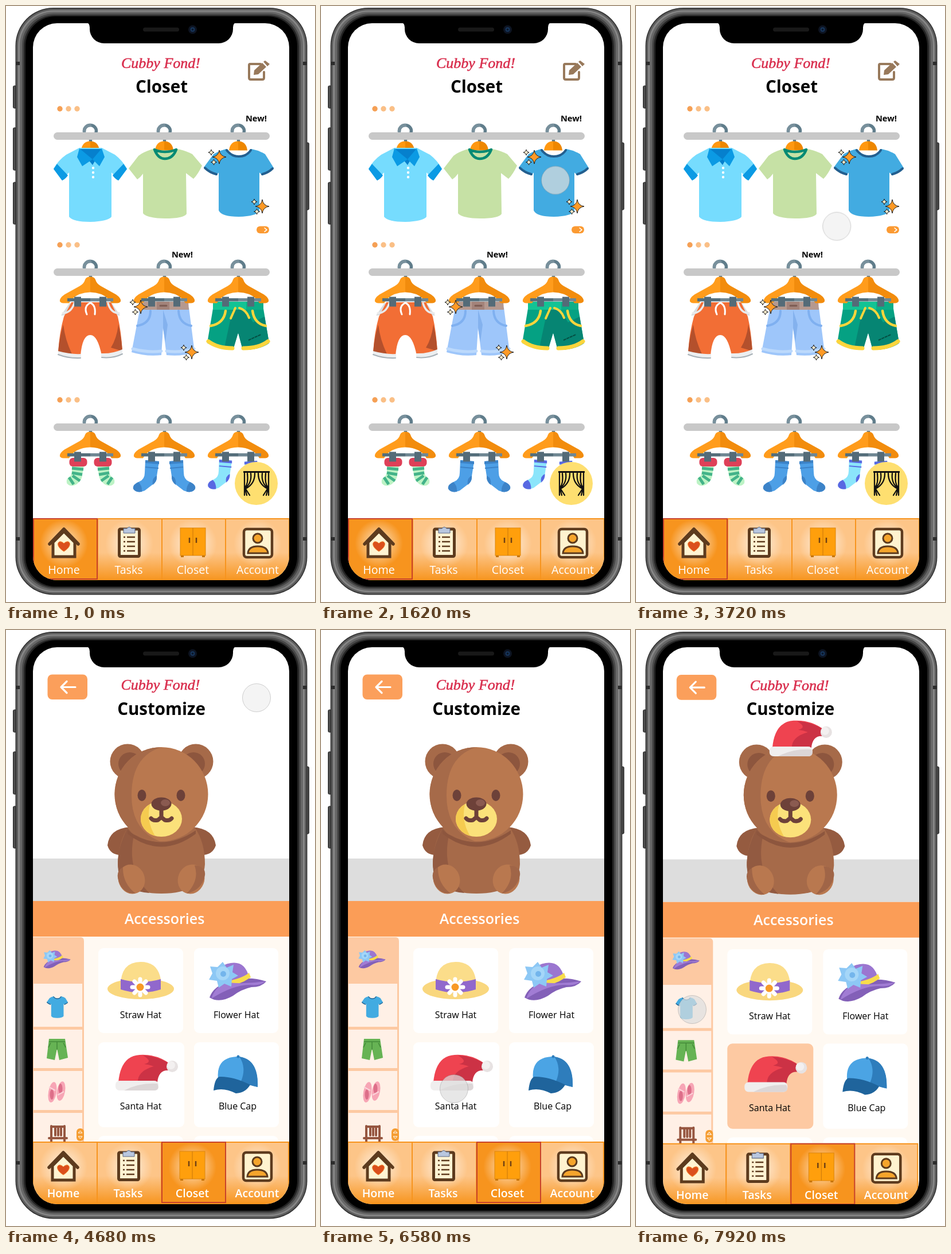
An HTML page for the animation above (8 s loop, 539 by 1038 pixels).

```html
<!DOCTYPE html>
<html lang="en">
<head>
<meta charset="utf-8">
<title>Closet app</title>
<style>
html, body { margin: 0; width: 100%; height: 100%; overflow: hidden; background: #fff; }
svg { display: block; width: 100%; height: 100%; }
text { font-family: 'Open Sans', 'Noto Sans', sans-serif; }
.logo { font: italic 26px 'Liberation Serif', 'Noto Serif', serif; fill: #d9304f; stroke: #d9304f; stroke-width: .6; text-anchor: middle; }
.title { font-size: 29.5px; font-weight: 650; text-anchor: middle; }
.new { font-size: 14.6px; font-weight: 700; }
.info { font-size: 20px; }
.b { font-weight: 600; }
.tab { font-size: 19.6px; fill: #fff; text-anchor: middle; }
.card { font-size: 16px; text-anchor: middle; }
.a { fill: var(--a); }
.c { fill: var(--c); }
.line { fill: none; stroke-linecap: round; stroke-linejoin: round; }
.faded { opacity: .33; filter: blur(2.5px); }

.page { visibility: hidden; animation: 8s step-end infinite; }
#closet { animation-name: closet; }
#popup { animation-name: popup; }
#plain { animation-name: plain; }
#dressed { animation-name: dressed; }
@keyframes closet { 0%, 39.75% { visibility: visible; } 22.5%, 58.5%, 100% { visibility: hidden; } }
@keyframes popup { 0%, 39.75%, 100% { visibility: hidden; } 22.5% { visibility: visible; } }
@keyframes plain { 0%, 83.5%, 100% { visibility: hidden; } 58.5% { visibility: visible; } }
@keyframes dressed { 0% { visibility: hidden; } 83.5%, 100% { visibility: visible; } }

#px { animation: moveX 8s linear infinite; }
#py { animation: moveY 8s linear infinite; }
#dot { fill: rgba(238,238,238,.65); stroke: rgba(125,125,125,.35); animation: show 8s step-end infinite, press 8s step-end infinite; }
@keyframes show { 0% { visibility: hidden; } 4.75%, 100% { visibility: visible; } }
@keyframes press {
  0%, 22.5%, 39.75%, 58.5%, 83.5% { fill: rgba(238,238,238,.65); }
  20.25%, 38%, 57%, 82.25%, 99%, 100% { fill: rgba(222,222,222,.71); }
}
@keyframes moveX {
  0%, 4.75% { transform: translateX(482px); animation-timing-function: ease; }
  10.75%, 12.75% { transform: translateX(404px); }
  13.75% { transform: translateX(409px); }
  26.75% { transform: translateX(409px); animation-timing-function: cubic-bezier(.37,0,.63,1); }
  36% { transform: translateX(279px); }
  45% { transform: translateX(279px); animation-timing-function: cubic-bezier(.3,1,.6,1); }
  54.25% { transform: translateX(437px); }
  63.25% { transform: translateX(437px); animation-timing-function: cubic-bezier(.76,0,.24,1); }
  78.75% { transform: translateX(232px); }
  89.5% { transform: translateX(232px); animation-timing-function: cubic-bezier(.45,0,.55,1); }
  98.25%, 100% { transform: translateX(98px); }
}
@keyframes moveY {
  0%, 4.75% { transform: translateY(29px); animation-timing-function: ease; }
  10.75%, 12.75% { transform: translateY(311px); }
  13.75% { transform: translateY(303.5px); }
  26.75% { transform: translateY(303.5px); animation-timing-function: cubic-bezier(.65,0,.35,1); }
  36% { transform: translateY(622px); }
  45% { transform: translateY(622px); animation-timing-function: cubic-bezier(.28,1,.57,1); }
  54.25% { transform: translateY(118px); }
  63.25% { transform: translateY(118px); animation-timing-function: cubic-bezier(.45,0,.55,1); }
  78.75% { transform: translateY(799px); }
  89.5% { transform: translateY(799px); animation-timing-function: cubic-bezier(.45,0,.55,1); }
  98.25%, 100% { transform: translateY(661px); }
}
</style>
</head>
<body>
<svg viewBox="0 0 539 1038">
<defs>
  <clipPath id="screen"><rect x="47" y="30" width="447" height="970" rx="42"/></clipPath>
  <clipPath id="list"><rect x="47" y="534" width="447" height="358"/></clipPath>
  <clipPath id="head"><ellipse cx="271" cy="286" rx="81.500" ry="82"/></clipPath>
  <clipPath id="muzzle"><ellipse cx="271" cy="329" rx="36" ry="31"/></clipPath>
  <linearGradient id="cell" x2="0" y2="1"><stop offset="0" stop-color="#fdc588"/><stop offset=".55" stop-color="#fdc588"/><stop offset="1" stop-color="#f7951f"/></linearGradient>
  <radialGradient id="glow"><stop offset=".3" stop-color="#fff" stop-opacity=".55"/><stop offset="1" stop-color="#fff" stop-opacity="0"/></radialGradient>

  <!-- clothes rail parts -->
  <g id="hook" class="line" stroke="#607d8b" stroke-width="5.500">
    <path d="M-10.500 -8v-1a10.500 10 0 0 1 21 0q0 8-10 11v10"/>
    <path d="M-10.500 -8v-1a10.500 10 0 0 1 10-10" stroke="#78909c"/>
  </g>
  <g id="rail">
    <use href="#hook" x="147"/><use href="#hook" x="276"/><use href="#hook" x="405"/>
    <rect x="83" y="-6.500" width="377" height="13" rx="6.500" fill="#c8c8c8"/>
    <g fill="#fabf86"><circle cx="94" cy="-47.500" r="4.700" fill="#f5a055"/><circle cx="109" cy="-47.500" r="4.700"/><circle cx="124" cy="-47.500" r="4.700"/></g>
  </g>
  <g id="dome"><path d="M-16 25Q-14 9 0 9V25z" fill="#ff9811"/><path d="M16 25Q14 9 0 9V25z" fill="#ee8700"/></g>
  <g id="hanger">
    <path d="M0 8Q-7 8-9 13Q-11 20-18 24L-45 39Q-54 45-53 51Q-51 54-47 54H-37Q-27 36 0 35z" fill="#ff9c1c"/>
    <path d="M0 8Q7 8 9 13Q11 20 18 24L45 39Q54 45 53 51Q51 54 47 54H37Q27 36 0 35z" fill="#f28c0d"/>
    <path d="M-40 45.500H0v5.500H-40z" fill="#546e7a"/><path d="M0 45.500H40v5.500H0z" fill="#6f8793"/>
    <path d="M-28 43h12v17h-12zM16 43h12v17H16z" fill="#546b78"/>
  </g>
  <g id="hangers"><use href="#hanger" x="147"/><use href="#hanger" x="276"/><use href="#hanger" x="405"/></g>
  <g id="spark" stroke="#222">
    <path d="M0-12Q1.500-1.500 12 0Q1.500 1.500 0 12Q-1.500 1.500-12 0Q-1.500-1.500 0-12Z" fill="#ff9a26"/>
    <path d="M-14-13q.6 4.400 5 5q-4.400.6-5 5q-.6-4.400-5-5q4.400-.6 5-5zM-9.500 4q.6 4.400 5 5q-4.400.6-5 5q-.6-4.400-5-5q4.400-.6 5-5z" fill="#fff1cf"/>
  </g>

  <!-- tops -->
  <g id="blueTee">
    <path d="M-22 0Q-34 3-44 9L-61 32Q-52 42-39 46L-35 41V107Q-30 118 0 118Q31 117 36 108V41L41 46Q53 42 61 33L46 9Q34 2 22 0Q14 11 0 11Q-13 11-22 0Z" fill="#42abe1"/>
    <g class="line" stroke="#235f8f" stroke-width="4"><path d="M-21 2Q-13 13 0 13Q14 13 21 2"/><path d="M-59 33Q-51 41-39 44M41 44Q52 41 59 34"/></g>
  </g>
  <g id="polo">
    <path d="M-19 0L-42 12Q-55 21-64 36L-50 56L-37 43V120Q-30 129 0 129Q31 128 37 120V43L50 56L64 36Q55 21 43 12L20 0z" fill="#76dcfe"/>
    <path d="M-58 28l-6 9l15 20q6-3 10-9zM58 28l6 9l-15 20q-6-3-10-9z" fill="#0b9ae4"/>
    <path d="M-18 2L4 30L20 2z" fill="#0680cd"/>
    <path d="M-19 1L-23 16L-14 32L4 20zM20 1L25 16L16 32L4 20z" fill="#0b9ae4"/>
    <g fill="#fff"><circle cx="5" cy="35" r="2.200"/><circle cx="5" cy="43" r="2.200"/><circle cx="5" cy="51" r="2.200"/></g>
  </g>
  <g id="greenTee">
    <path d="M-20 0Q-38 5-46 12L-63 34L-48 53Q-42 49-38 43V112Q-33 120 0 121Q33 121 38 113L37 42L50 52Q58 44 65 29L48 9Q34 2 21 0Q12 3 0 3Q-12 3-20 0Z" fill="#c6e1a5"/>
    <path d="M-18 1Q-12 17 0 17Q14 17 20 1Q10 5 0 5Q-10 5-18 1z" fill="#b2d293" class="line" stroke="#048a74" stroke-width="4.500"/>
  </g>

  <!-- bottoms -->
  <g id="redShorts">
    <path d="M-36 2L-51 24Q-38 25-28 8zM37 2L52 24Q40 25 31 8z" fill="#d8dde0"/>
    <path d="M-33 1L-46 26Q-54 54-56 88L-17 94Q-14 58 0 58Q13 58 20 94L56 86Q54 52 48 26L36 1z" fill="#f26e35"/>
    <path d="M-47 40Q-54 62-56 88L-32 91Q-44 66-47 40zM49 40Q46 64 36 80L56 86Q54 60 49 40z" fill="#b4502c"/>
    <path d="M-48 20Q-34 20-28 3M50 20Q36 20 31 3" class="line" stroke="#e9eaec" stroke-width="3.500"/>
    <path d="M-56 86Q-34 92-16 91V98Q-38 100-56 92zM56 83Q38 91 19 90V97Q40 99 56 91z" fill="#eceff1"/>
    <path d="M-56 92Q-38 99-17 98M56 91Q40 99 20 97" class="line" stroke="#a9b2b8" stroke-width="2"/>
    <path d="M0 2Q-12 8-6 22M0 2Q10 6 8 22" class="line" stroke="#fff" stroke-width="3"/>
  </g>
  <g id="jeans">
    <path d="M-42 10L-57 88Q-30 96-5 93L-2 45L4 93Q30 96 53 88L43 10z" fill="#9ec6fa"/>
    <path d="M-2 14V46L2 70L6 40z" fill="#84b2ee"/>
    <path d="M-43 0h85l1 14H-44z" fill="#b5998f"/><path d="M-13 0H9v14h-22z" fill="#a3837a"/>
    <path d="M-7 7H4" class="line" stroke="#7b5b52" stroke-width="3"/>
    <path d="M-24 16Q-24 38-47 42M25 16Q26 38 47 42" class="line" stroke="#7fb0f0" stroke-width="4"/>
    <path d="M-55 82Q-30 89-5 86M4 86Q30 89 52 82" class="line" stroke="#bcd9fc" stroke-width="5"/>
  </g>
  <g id="greenShorts">
    <path d="M-44 12L-54 72Q-35 84-9 84L0 54L8 84Q38 84 54 72L44 12z" fill="#05a183"/>
    <path d="M-10 14L-24 80L-9 84L0 54L8 84Q38 84 54 72L46 26L26 36L12 14z" fill="#068573"/>
    <path d="M-44 0H44V14H-44z" fill="#13c394"/><path d="M14 0H44V14H14z" fill="#0cae87"/>
    <g class="line" stroke="#fdd53c" stroke-width="4.500"><path d="M-22 16Q-25 38-48 42M25 16Q28 38 48 42"/><path d="M-52 69Q-36 81-10 81M9 81Q36 81 52 69" stroke-width="7"/><path d="M-5 11L-13 29M2 11Q14 14 19 28" stroke-width="4"/></g>
    <path d="M18 67l22-10" stroke="#054f43" stroke-width="2" stroke-dasharray="5 1"/>
  </g>

  <!-- socks -->
  <g id="sock">
    <path class="a" d="M-12 0L12 2L8 28Q9 37 0 43L-13 53Q-28 59-33 49Q-33 42-22 37Q-13 33-13 22z"/>
    <path class="c" d="M-24 38Q-35 43-33 50Q-29 57-18 55Q-17 45-24 38zM8 27Q-1 31 1 43Q9 37 8 27zM-12 0L12 2V7L-12 5z"/>
    <path d="M-12 12L11 14" stroke="var(--c)" stroke-width="2"/>
  </g>
  <g id="stripeSock">
    <path d="M-10 11L11 12L8 28Q8 38-2 45Q-13 51-19 43Q-21 35-13 31Q-9 26-10 11z" fill="#bdf3c5"/>
    <path d="M-10 17L10 19M-10 25L8 28M-9 30L4 39M-15 33L-7 45" stroke="#43b389" stroke-width="5"/>
    <rect x="-14.500" y="-1" width="31" height="15" rx="6" fill="#de4058"/>
  </g>
  <g id="socks">
    <use href="#stripeSock" x="125" y="788"/><use href="#stripeSock" transform="matrix(-1 0 0 1 170 788)"/>
    <g style="--a:#4d9fe6;--c:#3c83c8"><use href="#sock" x="255" y="791"/><use href="#sock" transform="matrix(-1 0 0 1 297 791)"/></g>
    <g style="--a:#8be5fb;--c:#5868e2"><use href="#sock" transform="translate(383 790) scale(.93)"/><use href="#sock" transform="matrix(-.93 0 0 .93 427 792)"/></g>
  </g>

  <!-- hats -->
  <g id="strawHat">
    <ellipse cx="235" cy="625" rx="58" ry="18" fill="#f9d77e"/>
    <path d="M200 625Q198 578 235 578Q272 578 271 625z" fill="#fbdd8a"/>
    <path d="M200 608Q235 618 270 608V626Q235 637 200 626z" fill="#9168cc"/>
    <path d="M234 608V636M220 622H248M224 612L244 632M244 612L224 632" stroke="#fff" stroke-width="7" stroke-linecap="round"/>
    <circle cx="234" cy="622" r="6.500" fill="#f89a26"/>
  </g>
  <g id="flowerHat">
    <path d="M355 640Q362 620 388 613Q420 601 454 612Q446 622 428 622Q410 626 396 637Q372 651 355 640z" fill="#8360b8"/>
    <path d="M375 619Q362 584 392 580Q417 576 424 605Q400 621 375 619z" fill="#9b76d0"/>
    <path d="M382 612Q410 608 424 597L427 605Q405 620 382 620z" fill="#f8dc4c"/>
    <path d="M386 614Q418 617 452 612Q444 620 426 618Q398 617 358 642Q366 619 386 614z" fill="#a17cd4"/>
    <g fill="#8dc8f5"><path d="M378 578l7 10 12-5-2 13 10 6-11 6-1 13-12-5-10 7-3-12-14-2 6-11-4-12 13 1z"/><circle cx="378" cy="598" r="12" fill="#a5d6f8"/><circle cx="379" cy="599" r="5" fill="#73b5ec"/></g>
  </g>
  <g id="santaHat">
    <path d="M196 788Q200 742 233 740Q264 738 288 757L282 766Q264 766 263 788z" fill="#ef4350"/>
    <path d="M239 741Q265 742 288 757L283 767Q266 766 264 788H230Q229 768 258 760Q250 757 241 756Q258 752 239 741z" fill="#cc3245"/>
    <rect x="191" y="785" width="75" height="17" rx="7" fill="#f0eeee"/><path d="M206 802Q233 788 264 790Q269 801 259 802z" fill="#dcd6d7"/>
    <circle cx="290" cy="760" r="10" fill="#e7e2e2"/><circle cx="288" cy="758" r="7" fill="#f3f0f0"/>
  </g>
  <g id="cap">
    <path d="M370 782Q366 745 402 743Q440 744 439 796Q415 789 390 781z" fill="#4ba4e4"/>
    <path d="M407 743Q441 748 439 796Q423 793 410 786Q420 762 407 743z" fill="#2e7dbc"/>
    <path d="M362 802Q364 781 372 778Q396 777 426 792Q418 806 401 807Q380 796 362 802z" fill="#1f649c"/><circle cx="405" cy="743" r="2.500" fill="#2e7dbc"/>
  </g>

  <!-- tab bar -->
  <g id="cells" stroke="#f7941e" stroke-width="2">
    <rect x="48" y="893" width="112" height="107" fill="url(#cell)"/><rect x="160" y="893" width="112" height="107" fill="url(#cell)"/>
    <rect x="272" y="893" width="111" height="107" fill="url(#cell)"/><rect x="383" y="893" width="111" height="107" fill="url(#cell)"/>
  </g>
  <rect id="selected" y="893" width="111" height="105" fill="#f7941e" stroke="#c8422b" stroke-width="2"/>
  <g id="icons">
    <g fill="url(#glow)"><circle cx="101" cy="936" r="42"/><circle cx="215" cy="936" r="42"/><circle cx="326" cy="936" r="42"/><circle cx="439" cy="936" r="42"/></g>
    <path d="M82 934L101 915L120 934V959H82z" fill="#fff4d2" stroke="#5d3b1e" stroke-width="5"/>
    <path d="M76 937L101 911L126 937" class="line" stroke="#5d3b1e" stroke-width="5.500"/>
    <path d="M101 950C83 939 92 927 101 936C110 927 119 939 101 950z" fill="#db4f1c" stroke="#f08a33"/>
    <rect x="197.500" y="911" width="35" height="47.500" rx="2" fill="#fff3d3" stroke="#5d3b1e" stroke-width="5"/>
    <path d="M205 918v-8h6q4-5 8 0h6v8z" fill="#b8c7df" stroke="#596782"/>
    <path d="M205 925h3m3 0h14M205 933h3m3 0h14M205 941h3m3 0h14M205 949h3m3 0h14" stroke="#5d3b1e" stroke-width="2.500"/>
    <rect x="304" y="909" width="44" height="48" fill="#ff9f0c" stroke="#dc850c"/><path d="M326 909v48" stroke="#c8760b"/><path d="M305 957h5v3h-5zM342 957h5v3h-5z" fill="#c8760b"/>
    <path d="M320 926v9M332 926v9" stroke="#704214" stroke-width="2.500"/>
    <rect x="415" y="911" width="49" height="49" rx="5" fill="#fff3cf" stroke="#5d3b1e" stroke-width="4.500"/>
    <g fill="#f5a52c" stroke="#5d3b1e" stroke-width="3"><circle cx="439" cy="927" r="8"/><path d="M422 953Q423 941 439 941Q456 941 457 953z"/></g>
    <text class="tab" x="101" y="989">Home</text><text class="tab" x="214" y="989">Tasks</text><text class="tab" x="326" y="989">Closet</text><text class="tab" x="439" y="989">Account</text>
  </g>
  <g id="curtain">
    <circle cx="436.500" cy="831.500" r="37.500" fill="#fedf70"/>
    <path d="M414 811.500H460" stroke="#111" stroke-width="3"/>
    <g id="drape" class="line" stroke="#111" stroke-width="2.300"><path d="M416 812V852M421 814Q423 832 417 838M427 814Q429 830 418 839M434 814Q434 832 419 840M418 841L425 852M417 841L420 852"/></g>
    <use href="#drape" transform="matrix(-1 0 0 1 874 0)"/>
  </g>
  <g id="header">
    <text class="logo" x="270" y="108">Cubby Fond!</text>
    <text class="title" x="271.500" y="151">Closet</text>
    <path d="M444 101H426q-2 0-2 2v22q0 3 3 3h20q3 0 3-3v-10" class="line" stroke="#98795b" stroke-width="4"/>
    <path d="M432 120l1-8 14-13 7 7-14 13zM449 97l3-2 8 6-4 4z" fill="#98795b"/>
  </g>

  <!-- customize screen -->
  <g id="bear">
    <g fill="#a66a49"><circle cx="212" cy="229" r="30.500"/><circle cx="331" cy="229" r="30.500"/></g>
    <g fill="#8d563e"><circle cx="216" cy="233" r="20"/><circle cx="327" cy="233" r="20"/></g>
    <path d="M216 343Q180 346 177 375Q184 400 222 388zM325 343Q362 346 366 375Q358 400 320 388z" fill="#955b40"/>
    <path d="M212 345Q196 370 195 408Q199 459 271 459Q344 459 347 408Q347 370 330 345z" fill="#a66a49"/>
    <path d="M212 345Q191 385 196 420Q206 455 250 458Q210 420 223 358z" fill="#925a41"/>
    <path d="M212 349Q270 390 331 349V355Q270 400 212 355z" fill="#8d563e"/>
    <ellipse cx="271" cy="286" rx="81.500" ry="82" fill="#b9784f"/>
    <path d="M271 204Q219 220 219 288Q219 350 271 369H180V204z" fill="#a66a49" clip-path="url(#head)"/>
    <g clip-path="url(#muzzle)"><path d="M230 295h80v70h-80z" fill="#fbe17a"/><path d="M254 295Q240 330 264 365H230V295z" fill="#f5cb50"/></g>
    <g fill="#6d4139"><ellipse cx="237" cy="288" rx="7.500" ry="10"/><ellipse cx="305" cy="288" rx="7.500" ry="10"/><ellipse cx="271" cy="303" rx="17.500" ry="11.500"/></g>
    <ellipse cx="278" cy="301" rx="8" ry="6" fill="#8a5a50"/>
    <path d="M271 314V326M253 328Q257 333 265 331Q271 326 271 326Q271 326 277 331Q285 333 289 328" class="line" stroke="#6d4139" stroke-width="7"/>
    <g fill="#b9784f"><ellipse cx="219" cy="434" rx="23" ry="26" transform="rotate(-22 219 434)"/><ellipse cx="323" cy="434" rx="23" ry="26" transform="rotate(22 323 434)"/></g>
    <path d="M204 413Q187 422 201 447Q210 460 226 459Q203 441 204 413zM329 410Q349 412 347 427Q342 453 315 459Q338 436 329 410z" fill="#a06547"/>
  </g>
  <g id="cards" clip-path="url(#list)">
    <path d="M47 534H494V892H47z" fill="#fff9f2"/>
    <path d="M47 535H130q6 0 6 7V892H47z" fill="#fdc9a2"/>
    <path d="M48 616H133V691H48zM48 696H133V763H48zM48 768H133V836H48zM48 841H133V892H48z" fill="#fff0e6"/>
    <g fill="#fff"><rect x="161" y="554" width="148" height="148" rx="9"/><rect x="328" y="554" width="147" height="148" rx="9"/><rect x="161" y="718" width="150" height="148" rx="9" fill="var(--pick)"/><rect x="328" y="718" width="148" height="148" rx="9"/><rect x="161" y="881" width="148" height="40" rx="9"/><rect x="328" y="881" width="147" height="40" rx="9"/></g>
    <use href="#flowerHat" transform="translate(-103 283) scale(.475)"/>
    <use href="#blueTee" transform="translate(89.500 638) scale(.305 .320)"/>
    <path d="M75 712h28l5 33-15 4-4-20-4 20-14-3z" fill="#66b354"/><path d="M75 717h28M89 717v14M78 719l-4 8M100 719l4 8" stroke="#438a38" fill="none" stroke-width="1.500"/>
    <g fill="#f7a5b5"><ellipse cx="81" cy="805" rx="7" ry="18" transform="rotate(10 81 805)"/><ellipse cx="96" cy="803" rx="7" ry="17" transform="rotate(10 96 803)"/></g>
    <g fill="#dd6f89"><ellipse cx="80" cy="809" rx="3.500" ry="9"/><ellipse cx="95" cy="799" rx="3.500" ry="9"/></g><path d="M75 796l11 6M90 810l11-6" stroke="#fbd2d9" stroke-width="2"/>
    <path d="M79 864V884M102 864V884M79 865H102M86 866V880M91 866V880M96 866V880M75 885H106M79 886V894M102 886V894" class="line" stroke="#965640" stroke-width="4"/>
    <rect x="123" y="868" width="13" height="22" rx="6" fill="#f59d32"/><path d="M126 876l3.500-4 3.500 4zM126 882l3.500 4 3.500-4z" fill="none" stroke="#fff"/>
    <use href="#strawHat"/><use href="#flowerHat"/><use href="#santaHat"/><use href="#cap"/>
    <text class="card" x="235" y="676">Straw Hat</text><text class="card" x="402" y="676">Flower Hat</text>
    <text class="card" x="235" y="835">Santa Hat</text><text class="card" x="404" y="835">Blue Cap</text>
  </g>
  <g id="customize">
    <path d="M45 398H496V472H45z" fill="#ddd"/>
    <rect x="72.500" y="77.500" width="69.500" height="43.500" rx="8" fill="#fb9f5b"/>
    <path d="M121 99.500H96M106 89.500L96 99.500L106 109.500" class="line" stroke="#fff" stroke-width="3.200"/>
    <text class="logo" x="269.500" y="104">Cubby Fond!</text><text class="title" x="271" y="147.500">Customize</text>
    <use href="#bear"/>
    <path d="M45 472H496V534H45z" fill="#fb9d57"/><text class="b" x="276.500" y="512" font-size="25" fill="#fff" text-anchor="middle">Accessories</text>
    <use href="#cards"/>
    <g transform="translate(-1 -1)"><use href="#cells"/><use href="#selected" x="273"/><use href="#icons" class="b"/></g>
  </g>
</defs>

<!-- phone body -->
<g fill="#4d4d4d" stroke="#222"><rect x="12.500" y="139" width="8" height="39" rx="2"/><rect x="12.500" y="212" width="8" height="74" rx="2"/><rect x="12.500" y="307" width="8" height="73" rx="2"/><rect x="520" y="238" width="8.500" height="117" rx="2"/></g>
<rect x="16.500" y="3" width="509" height="1022.500" rx="66" fill="#303030"/>
<rect x="18" y="4.500" width="506" height="1019.500" rx="64.500" fill="#5c5c5c"/>
<rect x="21" y="7.500" width="500" height="1013.500" rx="61.500" fill="#868686"/>
<rect x="24" y="10" width="494" height="1008.500" rx="59" fill="#686868"/>
<path d="M17 97h7v6h-7zM518 97h7v6h-7zM17 925h7v6h-7zM518 925h7v6h-7z" fill="#2c2c2c"/>
<rect x="28" y="13" width="486" height="1002.500" rx="56" fill="#484848"/>
<rect x="31" y="16" width="480" height="997" rx="54" fill="#242424"/>
<rect x="34" y="18" width="474" height="993" rx="52"/>

<g clip-path="url(#screen)">
  <path d="M47 30H494V1000H47z" fill="#fff"/>

  <g id="closet" class="page">
    <use href="#header"/>
    <use href="#rail" y="226.500"/><use href="#rail" y="463.500"/><use href="#rail" y="733.500"/>
    <use href="#dome" x="147" y="226.500"/><use href="#dome" x="276" y="226.500"/><use href="#dome" x="405" y="226.500"/>
    <use href="#polo" x="147" y="247"/><use href="#greenTee" x="277" y="249"/><use href="#blueTee" x="406" y="249"/>
    <use href="#spark" x="372" y="263"/><use href="#spark" x="447" y="349"/>
    <text class="new" x="418" y="201">New!</text><text class="new" x="289" y="438">New!</text>
    <rect x="437" y="383.500" width="22" height="12.500" rx="6.200" fill="#fb9a32"/><path d="M451 386.500l4 3.300-4 3.300" class="line" stroke="#fff" stroke-width="1.500"/>
    <use href="#redShorts" x="147" y="515"/><use href="#jeans" x="276" y="515"/><use href="#greenShorts" x="405" y="515"/>
    <use href="#hangers" y="463.500"/>
    <use href="#spark" x="235" y="524"/><use href="#spark" x="324" y="603"/>
    <use href="#socks"/><use href="#hangers" y="733.500"/>
    <use href="#curtain"/>
    <use href="#cells"/><use href="#selected" x="48"/><use href="#icons"/>
  </g>

  <g id="popup" class="page">
    <g class="faded">
      <use href="#header" y="-5"/>
      <use href="#rail" y="221"/><use href="#rail" y="460"/><use href="#rail" y="731.500"/>
      <use href="#dome" x="145" y="221"/><use href="#dome" x="275" y="221"/><use href="#dome" x="405" y="221"/>
      <text class="new" x="158" y="196">New!</text>
      <use href="#blueTee" x="146" y="244"/><use href="#spark" x="105" y="258"/><use href="#greenTee" x="276" y="245"/>
      <path d="M387 244L352 275L372 292V370Q410 380 451 371L448 282L460 270L425 244z" fill="#76dcfe"/><path d="M425 246L448 282L460 270Q450 250 425 246z" fill="#f28c0d"/><path d="M418 270l25 35-5 12-20-28z" fill="#43b389"/>
      <use href="#redShorts" x="145" y="512"/><use href="#jeans" x="275" y="512"/><use href="#greenShorts" x="405" y="512"/>
      <use href="#hangers" x="-1" y="460"/><use href="#socks" x="-1" y="-2"/><use href="#hangers" x="-1" y="731.500"/>
    </g>
    <rect x="125" y="253" width="293" height="424.500" rx="8" fill="#fffcf5" stroke="#f7941e" stroke-width="4" stroke-dasharray="13.500 6.500"/>
    <text class="info b" x="271" y="292" text-anchor="middle">Blue Tshirt</text>
    <use href="#blueTee" x="270.500" y="312"/>
    <g class="info">
      <text x="142" y="475"><tspan class="b">Date Received:</tspan> 05/18/2020</text>
      <text x="141" y="510"><tspan class="b">Goal Achieved:</tspan> You</text>
      <text x="141" y="545">accomplished 20 tasks in 2</text><text x="141" y="579">days!</text>
    </g>
    <rect x="224" y="607" width="100" height="38" rx="8" fill="#79b25c"/><text class="info b" x="274" y="633" fill="#fff" text-anchor="middle">Wear</text>
    <use href="#curtain"/>
    <g transform="translate(-1 0)"><use href="#cells"/><use href="#selected" x="273"/><use href="#icons"/></g>
  </g>

  <g id="plain" class="page" style="--pick:#fff"><use href="#customize"/></g>
  <g id="dressed" class="page" style="--pick:#fdc9a2">
    <g transform="matrix(1 0 0 1.0027 -1.700 .4)"><use href="#customize"/><use href="#santaHat" x="43.500" y="-583"/></g>
  </g>
</g>

<!-- notch -->
<path d="M138 28q8 1 8 9v3a25 25 0 0 0 25 25H371a25 25 0 0 0 25-25v-3q0-8 8-9z"/>
<rect x="239" y="37.500" width="63" height="7" rx="3.500" fill="#191919"/>
<circle cx="325.500" cy="41" r="7.500" fill="#0d1422"/><circle cx="325.500" cy="41" r="4" fill="#163459"/><circle cx="325.500" cy="41" r="1.800" fill="#0b1727"/>

<g id="px"><g id="py"><circle id="dot" r="24.500"/></g></g>
</svg>
</body>
</html>
```
